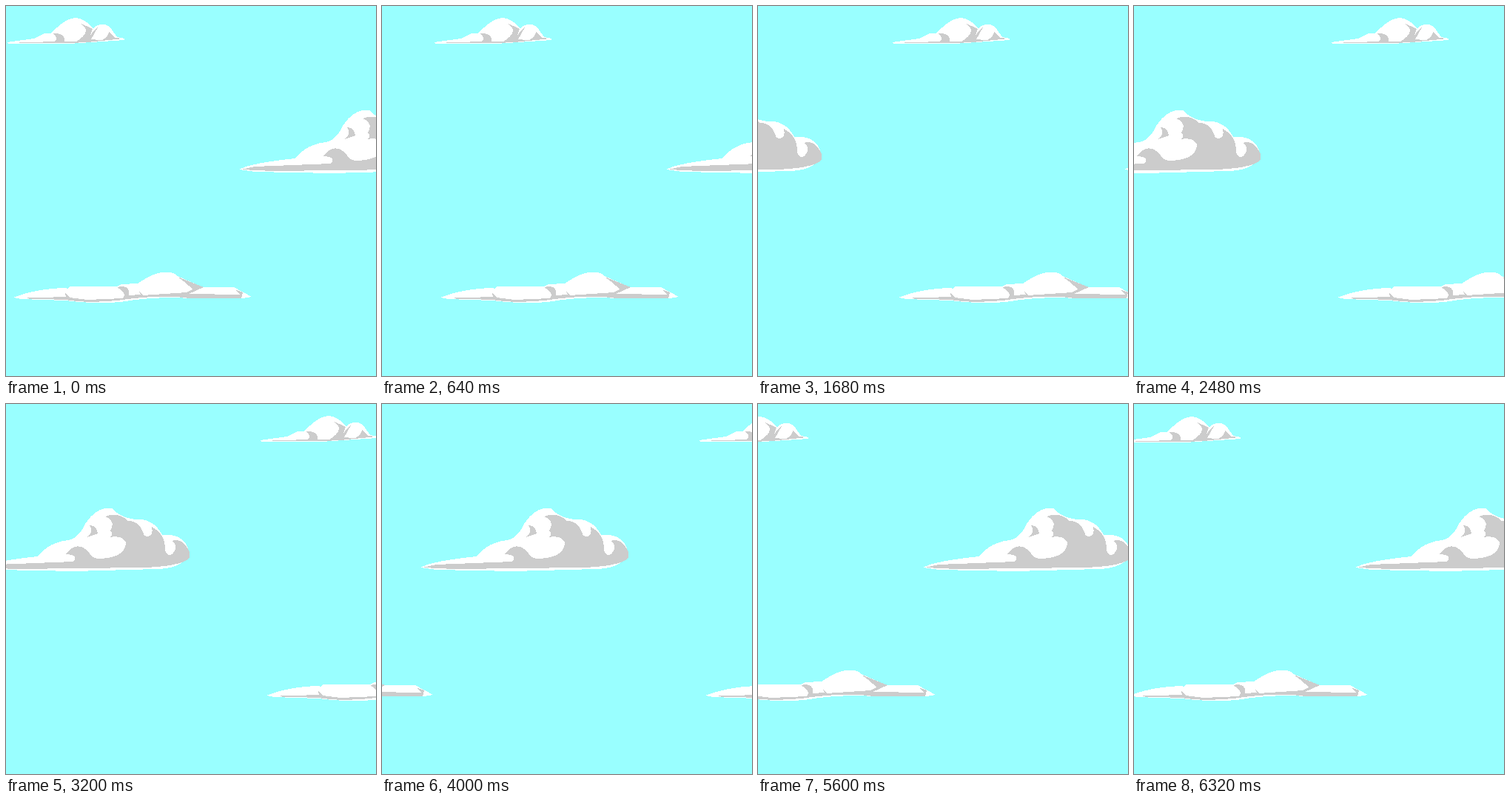
Write an HTML page that moves like this. It is 500x500 px and loops after 6.4 s.

```html
<!DOCTYPE html>
<html lang="en">
<head>
<meta charset="utf-8">
<title>Drifting clouds</title>
<style>
  html, body { margin: 0; width: 100%; height: 100%; overflow: hidden; background: #9ff; }
  svg { display: block; width: 500px; height: 500px; shape-rendering: crispEdges; }
  .light { fill: #fff; }
  .shade { fill: #ccc; }
</style>
</head>
<body>
<svg viewBox="0 0 500 500">
  <defs>
    <g id="small">
      <path class="light" d="M1 49L38 44 52 37H61Q80 16 95 16Q106 17 118 30Q130 20 141 29L150 42 160 44V46L85 51H4z"/>
      <path class="shade" d="M2 50L66 48Q72 43 63 37Q80 36 79 48H95Q118 34 100 23L117 31 112 45 130 46Q138 42 139 35L148 43 158 44 110 49 85 50z"/>
      <path class="shade" d="M124 29Q114 37 111 46L115 45z"/>
    </g>
    <g id="large" transform="translate(261)">
      <path class="light" d="M54 221Q70 212 130 206Q146 186 172 184Q186 180 194 162Q210 138 230 141Q242 154 262 156Q286 154 298 177Q331 174 335 204Q322 223 290 223L180 226 75 224z"/>
      <path class="shade" d="M57 221L75 217 178 213Q186 204 168 203Q182 184 198 199Q204 209 212 209Q249 208 249 187Q244 177 228 180Q232 176 228 171Q236 158 221 152Q238 145 252 158Q268 158 274 178Q287 182 284 166Q303 176 302 198Q308 212 316 196Q317 188 311 185Q326 180 335 200V208Q322 220 270 221L100 223z"/>
      <path class="shade" d="M200 164Q210 164 211 175L196 180Q206 173 200 164z"/>
    </g>
    <g id="long">
      <path class="light" d="M10 394Q40 382 80 381L83 382 86 379H150L156 376 178 375Q200 360 213 360Q224 358 232 365L266 380H308L332 393 320 395H250Q200 392 155 400Q120 403 80 398L20 396z"/>
      <path class="shade" d="M11 395L81 393 80 388 86 394 110 397 158 395Q164 388 150 380Q168 376 166 391L182 390 180 386 185 391 244 387 252 383Q246 376 232 366L267 380 247 389 316 390 311 384 320 387 318 395H248Q210 389 150 398Q110 402 80 397L50 396z"/>
    </g>
  </defs>
</svg>
<script>
const STEP = 80, LOOP = 6400, SPAN = 690;
const svg = document.querySelector('svg');

function addCloud(id, dx, dy) {
  const use = document.createElementNS(svg.namespaceURI, 'use');
  use.setAttribute('href', '#' + id);
  svg.append(use);
  return { use, dx, dy };
}

// Each cloud has a second copy that enters from the left.
const clouds = ['small', 'large', 'long'].flatMap(id => [
  addCloud(id, 0, 0),
  addCloud(id, -SPAN, id === 'small' ? 1 : 0)
]);

function draw(now) {
  const step = Math.floor((now % LOOP) / STEP);
  const drift = step ? Math.floor(1.8 + 8.52 * step) : 0;
  for (const { use, dx, dy } of clouds) {
    use.setAttribute('transform', `translate(${drift + dx} ${dy})`);
  }
}

const start = performance.now();
function tick() {
  draw(performance.now() - start);
  requestAnimationFrame(tick);
}
tick();
</script>
</body>
</html>
```
